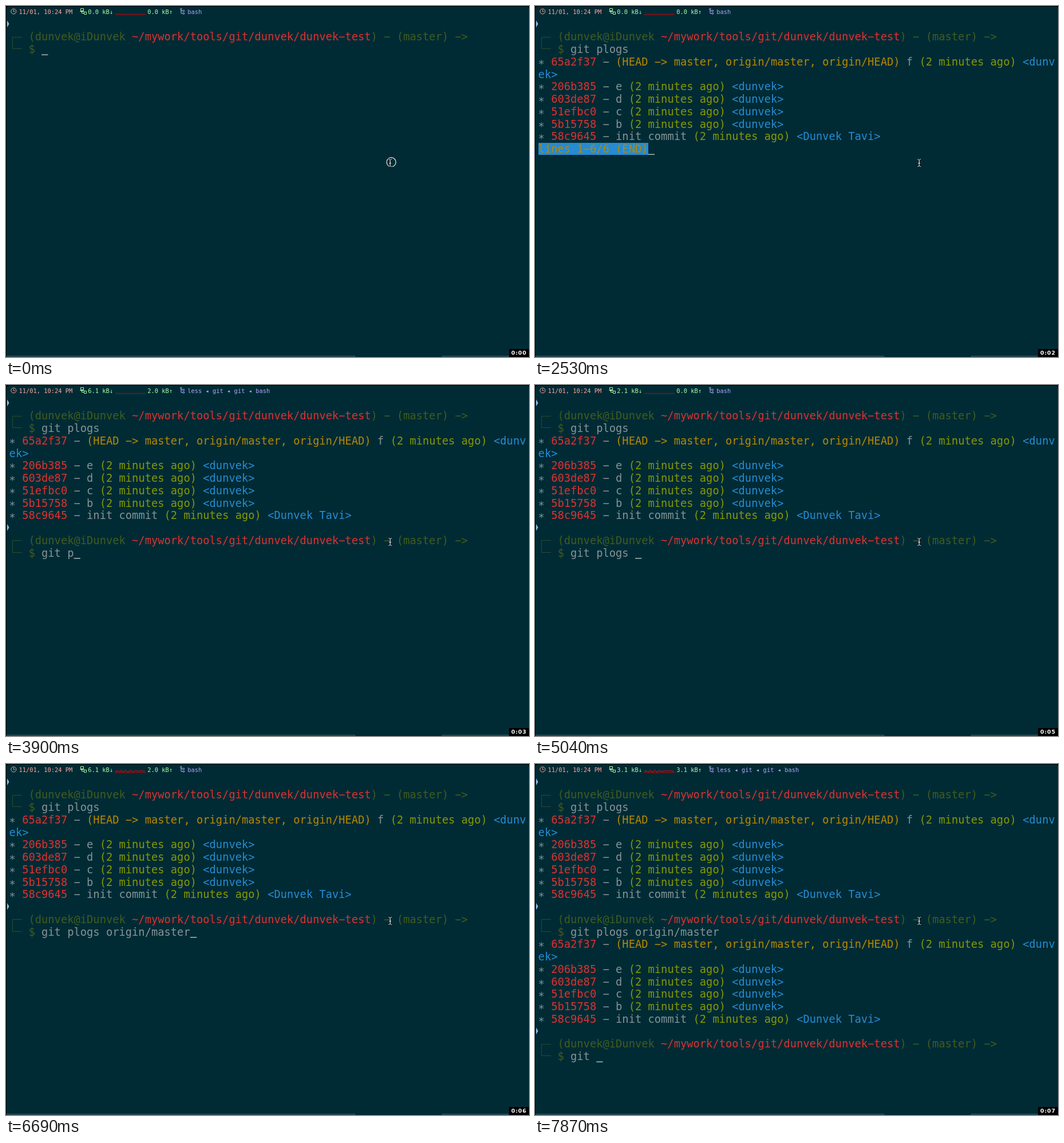
These frames come from a looping animation (914x613 px, 8000 ms). An HTML page:

```html
<!DOCTYPE html>
<html lang="en">
<head>
<meta charset="utf-8">
<title>Terminal session</title>
<style>
  html, body { margin: 0; width: 100%; height: 100%; overflow: hidden; background: #000; }
  #stage { position: relative; width: 914px; height: 613px; overflow: hidden; background: #000; }
  #window { position: absolute; left: 1px; top: 1px; right: 0; bottom: 0; background: #002b35; border-radius: 4px 4px 0 0; }
  .row, .bar, #clock { position: absolute; white-space: pre; font-family: "DejaVu Sans Mono", monospace; font-variant-ligatures: none; }
  .row { left: 5.6px; height: 21.75px; font-size: 18.765px; line-height: 21.75px; color: #839496; }
  .bar { top: 4px; font-size: 10.4px; line-height: 12px; }
  .dim { color: #405c1e; }
  .red { color: #dc322f; }
  .gold { color: #b58900; }
  .olive { color: #859900; }
  .blue { color: #268bd2; }
  .status { color: #b58900; background: #268bd2; }
  .pink { color: #ffa6a0; }
  .mint { color: #aaffa6; }
  .lilac { color: #b0a8ff; }
  svg { position: absolute; left: 0; top: 0; overflow: visible; }
  #clock { left: 879px; top: 599px; width: 35px; height: 14px; background: #000; color: #fff;
    font: bold 9.5px/14px "DejaVu Sans", sans-serif; letter-spacing: .8px; text-align: center; }
</style>
</head>
<body>
<div id="stage">
  <div id="window"></div>
  <div id="screen"></div>
  <svg width="914" height="613" fill="none">
    <rect id="cursor" width="11.3" height="1.4" fill="#b4c0c0"/>
    <g stroke="#ffa6a0"><circle cx="13.3" cy="9.5" r="4.5"/><path d="M13.3 6.5V9.8H15.6"/></g>
    <path stroke="#aaffa6" d="M130.5 4.5h5v4h-5zM136.5 10.5h4v4h-4zM132.5 9v3.5h4M129.5 9.5h7"/>
    <g stroke="#b0a8ff"><circle cx="306" cy="5.5" r="1.4"/><circle cx="310.5" cy="8.5" r="1.4"/>
      <circle cx="310.5" cy="13" r="1.4"/><path d="M306 7v6h3M306 8.5h3"/></g>
    <path stroke="#c80000" d="M191 14.5H244"/>
    <path id="spark" stroke="#d0101c"/>
    <path stroke="#47636a" d="M1 611.5H609.5V613M762.5 613V611.5H914"/>
    <circle id="click" cx="673.3" cy="272.7" r="8" stroke="#f4f4f4" stroke-width="1.2"/>
    <g stroke-linecap="round">
      <path stroke="#001418" stroke-width="2.6" d="M668.7 267.5q2.7 0 2.7 2v9q0 2-2.7 2M674.1 267.5q-2.7 0-2.7 2v9q0 2 2.7 2M669.8 274.5h3.2"/>
      <path stroke="#f4f4f4" stroke-width=".9" d="M668.7 267.5q2.7 0 2.7 2v9q0 2-2.7 2M674.1 267.5q-2.7 0-2.7 2v9q0 2 2.7 2M669.8 274.5h3.2"/>
    </g>
  </svg>
  <div class="bar pink" style="left:22.5px">11/01, 10:24 PM</div>
  <div class="bar mint" id="down" style="left:143.3px"></div>
  <div class="bar mint" id="up" style="left:247.3px"></div>
  <div class="bar lilac" id="job" style="left:317.3px"></div>
  <div id="clock"></div>
</div>
<script>
const LOOP = 8000, CELL = 11.297, ROW = 21.75, LEFT = 5.6, TOP = 43.25;
const $ = id => document.getElementById(id);
const COMMANDS = ['git plogs', 'git plogs origin/master', 'git '];

// Phases cycle through: 0 prompt, 1 pager, 2 pager closed.
const PHASES = [[0, 0], [2530, 1], [3460, 2], [3550, 3], [6780, 4], [7400, 5], [7490, 6]];

// Typed length over time, one list per command.
const TYPING = [
  [[0, 0], [1160, 1], [1250, 3], [1340, 4], [1490, 5], [1580, 6], [1750, 8], [2260, 9]],
  [[0, 0], [3640, 1], [3720, 2], [3790, 3], [3840, 4], [3900, 5], [3960, 6], [4290, 8], [4390, 9], [4500, 10],
   [5310, 11], [5400, 12], [5490, 13], [5580, 14], [5650, 16], [5800, 17],
   [5980, 18], [6070, 19], [6160, 20], [6250, 21], [6430, 22], [6520, 23]],
  [[0, 0], [7670, 1], [7780, 3], [7870, 4]]
];
const NET = [[0, '0.0', '0.0'], [660, '1.0', '0.0'], [1580, '0.0', '0.0'], [2620, '1.0', '0.0'],
  [3550, '6.1', '2.0'], [4680, '2.1', '0.0'], [5580, '1.0', '0.0'], [6600, '6.1', '2.0'], [7580, '3.1', '3.1']];
const PAGER_JOB = 'less ◂ git ◂ git ◂ bash';
const JOBS = [[0, 'bash'], [3250, PAGER_JOB], [4120, 'bash'], [6960, PAGER_JOB]];
const CLOCK = [[0, 0], [990, 1], [1990, 2], [2980, 3], [4000, 4], [5040, 5], [5980, 6], [7140, 7]];

const at = (table, t) => table.findLast(step => step[0] <= t);

function addRow(parent, row, ...parts) {
  const div = document.createElement('div');
  div.className = 'row';
  div.style.top = TOP + row * ROW + 'px';
  for (const [color, text] of parts) {
    const span = document.createElement('span');
    span.className = color;
    span.textContent = text.replace(/-/g, '−').replace(/\*/g, '∗');
    div.append(span);
  }
  parent.append(div);
  return div.lastChild;
}

function addGroup() {
  const group = document.createElement('div');
  $('screen').append(group);
  return group;
}

function addPromptArt(group, row) {
  const y = TOP + row * ROW + 10.9;
  group.insertAdjacentHTML('beforeend', `<svg width="914" height="613" fill="none">
    <path stroke="#2c4a2a" d="M28 ${Math.floor(y) + .5}H11.5V${Math.floor(y + ROW) - .5}H28"/>
    <path fill="#9fc0f0" d="M2 ${y - 28.8}l3.4 6-3.4 6z"/></svg>`);
}

function addLog(group, row) {
  const age = '(2 minutes ago) ', user = '<dunvek>';
  const commit = (r, hash, text, author) =>
    addRow(group, r, ['', '* '], ['red', hash], ['', ` - ${text} `], ['olive', age], ['blue', author]);
  addRow(group, row, ['', '* '], ['red', '65a2f37'], ['', ' - '],
    ['gold', '(HEAD -> master, origin/master, origin/HEAD)'], ['', ' f '], ['olive', age], ['blue', user.slice(0, 5)]);
  addRow(group, row + 1, ['blue', user.slice(5)]);
  [['206b385', 'e'], ['603de87', 'd'], ['51efbc0', 'c'], ['5b15758', 'b']]
    .forEach(([hash, text], i) => commit(row + 2 + i, hash, text, user));
  commit(row + 6, '58c9645', 'init commit', '<Dunvek Tavi>');
}

const blocks = COMMANDS.map((_, i) => {
  const row = i * 10, prompt = addGroup(), log = addGroup(), pager = addGroup();
  addPromptArt(prompt, row);
  addRow(prompt, row, ['dim', '   (dunvek@iDunvek '], ['red', '~/mywork/tools/git/dunvek/dunvek-test'],
    ['dim', ') - (master) ->']);
  const typed = addRow(prompt, row + 1, ['dim', '   $ '], ['', '']);
  if (i < 2) {
    addLog(log, row + 2);
    addRow(pager, row + 9, ['status', 'lines 1-6/6 (END)']);
  }
  return { prompt, log, pager, typed };
});

let spark = 'M191 14';
for (let i = 1; i < 27; i++) {
  const h = Math.abs(Math.sin(i * 2.3) * 2.4 + Math.sin(i * .9) * 1.6);
  spark += `L${191 + i * 2} ${(14 - h).toFixed(1)}`;
}
$('spark').setAttribute('d', spark);

const show = (el, on) => { el.style.visibility = on ? 'visible' : 'hidden'; };
const setText = (el, text) => { if (el.textContent !== text) el.textContent = text; };

function render(t) {
  const phase = at(PHASES, t)[1], current = Math.floor(phase / 3), mode = phase % 3;
  const lengths = TYPING.map(steps => at(steps, t)[1]);
  blocks.forEach((b, i) => {
    show(b.prompt, phase >= i * 3);
    show(b.log, phase > i * 3);
    show(b.pager, phase === i * 3 + 1);
    setText(b.typed, COMMANDS[i].slice(0, lengths[i]));
  });

  const col = [5 + lengths[current], 17, 0][mode];
  const row = current * 10 + (mode ? 9 : 1);
  $('cursor').setAttribute('x', LEFT + col * CELL);
  $('cursor').setAttribute('y', TOP + row * ROW + 19.5);

  const [, down, up] = at(NET, t);
  setText($('down'), down + ' kB↓');
  setText($('up'), up + ' kB↑');
  setText($('job'), at(JOBS, t)[1]);
  setText($('clock'), '0:0' + at(CLOCK, t)[1]);
  show($('spark'), t >= 6600);
  show($('click'), t < 90);
}

const start = performance.now();
function tick() {
  render((performance.now() - start) % LOOP);
  requestAnimationFrame(tick);
}
tick();
</script>
</body>
</html>
```
